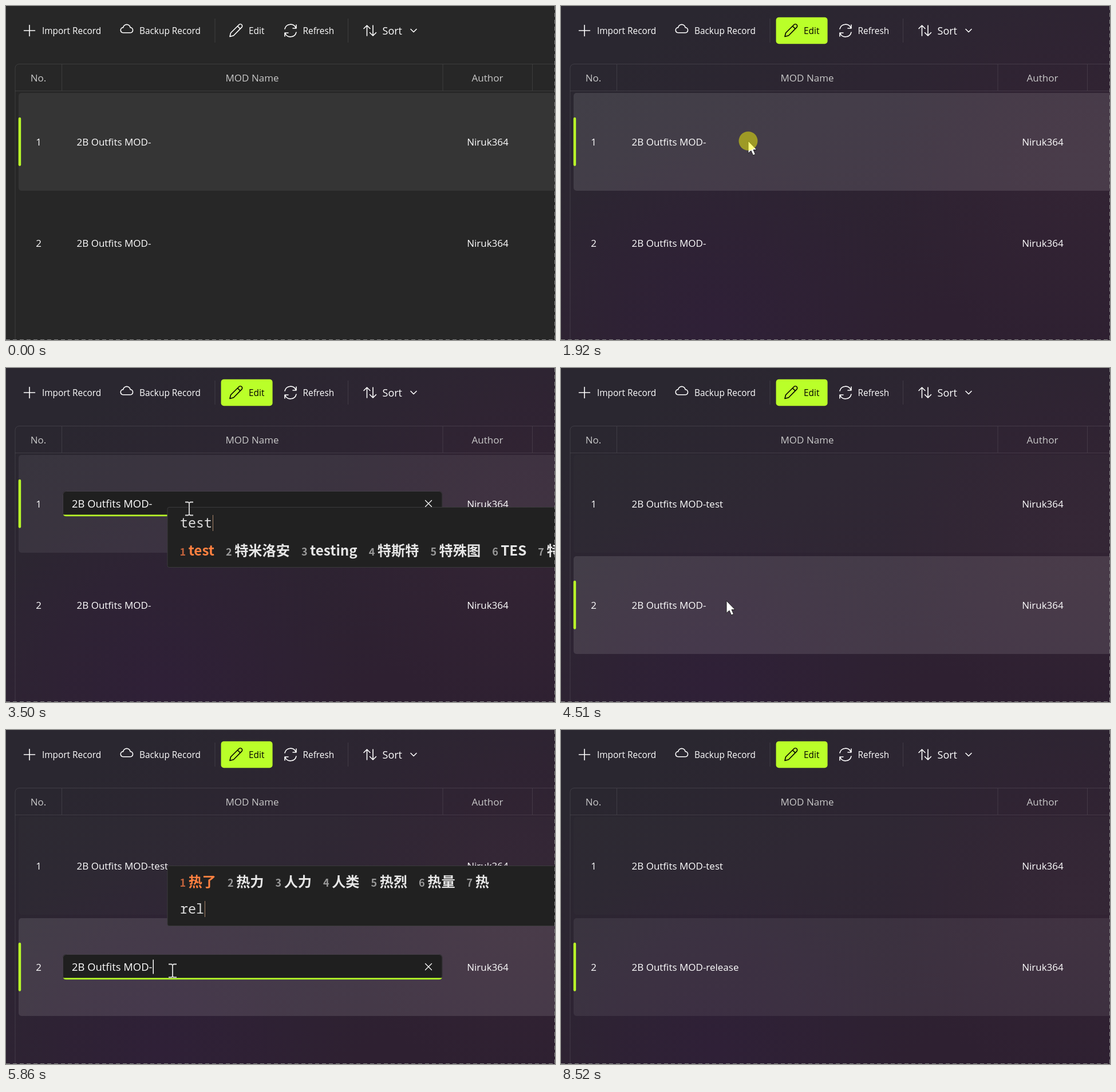
An HTML page that plays this animation: 959x584 px, repeating every 8.69 s.

```html
<!DOCTYPE html>
<html lang="en">
<head>
<meta charset="utf-8">
<title>Inline rename in a record table</title>
<style>
  html, body { margin: 0; width: 100%; height: 100%; overflow: hidden; background: #272727; }
  svg { display: block; width: 100vw; height: 100vh; }
  text { font: 17px "Open Sans", "Noto Sans", sans-serif; fill: #fff; white-space: pre; }
  .tool { font-size: 15.4px; }
  .head { fill: #c9c9c9; }
  .mid { text-anchor: middle; }
  .field { font-size: 18.4px; }
  .typed { font: 23.3px "Noto Sans Mono", monospace; fill: #ddd; }
  .words { font: 700 24.2px "Noto Sans CJK SC", "Noto Sans CJK", sans-serif; fill: #e6e6e6; }
  .num { font-size: 18px; fill: #999; }
  .icon { fill: none; stroke: #fff; stroke-width: 1.6; stroke-linecap: round; stroke-linejoin: round; }
  .line { fill: none; stroke: #fff; stroke-opacity: .1; }
  .dash { fill: none; stroke: #858585; stroke-dasharray: 7 5; }
</style>
</head>
<body>
<svg viewBox="0 0 959 584" preserveAspectRatio="none">
  <defs>
    <linearGradient id="tint" gradientUnits="userSpaceOnUse" x1="250" y1="0" x2="600" y2="584">
      <stop offset="0" stop-color="#2a2730"/>
      <stop offset=".4" stop-color="#2d2532"/>
      <stop offset="1" stop-color="#2e2031"/>
    </linearGradient>
    <radialGradient id="violet" gradientUnits="userSpaceOnUse" cx="270" cy="560" r="330">
      <stop offset="0" stop-color="#2f2037"/>
      <stop offset="1" stop-color="#2f2037" stop-opacity="0"/>
    </radialGradient>
    <radialGradient id="plum" gradientUnits="userSpaceOnUse" cx="900" cy="290" r="330">
      <stop offset="0" stop-color="#332434"/>
      <stop offset="1" stop-color="#332434" stop-opacity="0"/>
    </radialGradient>
    <clipPath id="fieldShape"><rect x="99" y="215" width="663.5" height="44.5" rx="6"/></clipPath>
  </defs>

  <rect width="959" height="584" fill="#272727"/>
  <g id="mica">
    <rect width="959" height="584" fill="url(#tint)"/>
    <rect width="959" height="584" fill="url(#violet)"/>
    <rect width="959" height="584" fill="url(#plum)"/>
  </g>

  <rect id="editButton" x="375.6" y="19.7" width="90" height="46.500" rx="5"/>
  <g class="icon">
    <path d="M31.500 43H50.500M41 33.500V52.500"/>
    <path d="M205 46.800a4.600 4.600 0 0 1-.3-9.200a6.300 6.300 0 0 1 12.400 0a4.600 4.600 0 0 1-.3 9.200Z"/>
    <path id="pencil" d="M391 53.500l1.600-6.500L407 32.700a3.200 3.200 0 0 1 4.700 4.700L397.500 51.800ZM404.500 35.200l4.700 4.700"/>
    <path d="M487 40a10.300 10.300 0 0 1 19.500-1.500M507 33v6h-6M507 46a10.300 10.300 0 0 1-19.500 1.500M487 53v-6h6"/>
    <path d="M630.500 52V34M625 39.500l5.500-5.500l5.500 5.500M641 34V52M635.500 46.500l5.500 5.500l5.500-5.500"/>
    <path d="M707 40.500l5 5l5-5"/>
  </g>
  <text class="tool" x="63" y="49">Import Record</text>
  <text class="tool" x="233" y="49">Backup Record</text>
  <text class="tool" id="editLabel" x="424" y="49">Edit</text>
  <text class="tool" x="518.500" y="49">Refresh</text>
  <text x="657.500" y="49.500" style="font-size:18px">Sort</text>
  <path class="line" d="M365 22V64M597.500 22V64"/>

  <path class="line" d="M16 584V108.500a7 7 0 0 1 7-7H959M16 148.500H959M97.500 102V148M763 102V148M919.500 102V148"/>
  <text class="head mid" x="56.500" y="132">No.</text>
  <text class="head mid" x="430" y="132">MOD Name</text>
  <text class="head mid" x="841" y="132">Author</text>

  <g id="rows"></g>

  <g id="field">
    <rect x="99" y="215" width="663.500" height="44.500" rx="6" fill="#1f1f1f"/>
    <rect x="99.500" y="215.500" width="662.500" height="43.500" rx="6" fill="none" stroke="#433d46"/>
    <rect x="99" y="256.500" width="664" height="3" fill="#baff29" clip-path="url(#fieldShape)"/>
    <rect id="selection" x="116" y="224" width="140.500" height="25" fill="#baff29"/>
    <text class="field" id="fieldText" x="115" y="244"></text>
    <rect id="caret" y="224.500" width="1.500" height="25" fill="#fff"/>
    <path class="icon" d="M732.500 231.500l11 11m0-11l-11 11" style="stroke-width:1.3"/>
  </g>

  <g id="popup">
    <rect x="282" y="0.500" width="690" height="105" rx="3" fill="#212121" stroke="#3b3a3c"/>
    <g id="typedLine">
      <text class="typed" id="typed" x="304" y="36"></text>
      <rect id="typedCaret" y="14" width="1" height="28" fill="#a9856a"/>
    </g>
    <text class="words" id="words" x="303.500"></text>
  </g>

  <path class="dash" d="M0 583.500H959M958.500 0V584"/>

  <path id="arrow" d="M0 0V21.500L5 17L8.500 25L12.500 23.300L9 15.500H15Z" fill="#fff" stroke="#222"/>
  <path id="beam" d="M-7 -11.500H-2L0 -10L2 -11.500H7M0 -10V10M-7 11.500H-2L0 10L2 11.500H7"
        fill="none" stroke="#fff" stroke-width="1.8" style="mix-blend-mode:difference"/>
  <circle id="press" r="16.500" fill="#ff0" fill-opacity=".48"/>
</svg>

<script>
const LOOP = 8690, ROW_STEP = 177, LIME = '#baff29', BASE = '2B Outfits MOD-';
const $ = id => document.getElementById(id);
const show = (id, on) => $(id).style.display = on ? '' : 'none';
const within = (t, ranges) => ranges.some(([from, to]) => t >= from && t < to);
const attr = (id, name, value) => $(id).setAttribute(name, value);
const place = (id, x, y) => attr(id, 'transform', `translate(${x} ${y})`);

// Pointer waypoints: time, x, y
const path = [
  [170, 335, 572], [750, 432, 50], [1290, 432, 50], [1760, 327, 236],
  [2280, 327, 236], [2450, 320, 246], [4110, 320, 246], [4370, 289, 407],
  [4640, 289, 407], [4800, 291, 412], [4950, 291, 412], [5100, 291, 421],
  [8430, 291, 421], [8520, 355, 590]
];
const presses = [[1110, 1230], [1790, 1860], [1920, 2050], [4390, 4470], [4620, 4760]];

const edits = [
  { row: 0, open: 1950, deselect: 2280, commit: 3630, close: 3860, word: 'test', beam: 2120,
    caretOn: [[1950, 2440], [2970, 3500]] },
  { row: 1, open: 4640, deselect: 4950, commit: 6570, close: 7430, word: 'release', beam: 5000,
    caretOn: [[4640, 5150], [5680, 6190], [6700, 7230]] }
];

// Input method states: time, typed letters, candidates
const suggestions = [
  [2630, 't', '他 她 它 天 图 太 听 头 条'],
  [2860, 'te', '特 特别 特点 特斯 忑 特色 特殊 特'],
  [3010, 'tes', '特色 特斯 特殊 test 特设 特 特使'],
  [3170, 'test', 'test 特米洛安 testing 特斯特 特殊图 TES 特殊'],
  [5560, 'r', '人 让 如 日 然 热 入 认 若'],
  [5640, 're', '热 人 惹 热爱 热门 热点 热烈 热'],
  [5760, 'rel', '热了 热力 人力 人类 热烈 热量 热'],
  [5890, 'relea', 'release 热了啊 relea 热乐 热 real'],
  [5990, 'release', 'release 热了 releases 人类 released rel'],
  [6420, 'release', 'release 热了 releases 人类 released releasing']
];

$('rows').innerHTML = [0, 1].map(i => `
  <g transform="translate(0 ${i * ROW_STEP})">
    <rect id="fill${i}" x="22" y="152" width="945" height="171" rx="5" fill="#fff"/>
    <rect id="bar${i}" x="21.700" y="194.800" width="4.500" height="85" rx="2.200" fill="${LIME}"/>
    <text class="mid" x="57" y="244">${i + 1}</text>
    <text id="name${i}" x="123.500" y="244"></text>
    <text class="mid" x="841.500" y="244">Niruk364</text>
  </g>`).join('');

function pointerAt(t) {
  const next = path.findIndex(point => point[0] > t);
  if (next < 1) return null;
  const [t0, x0, y0] = path[next - 1], [t1, x1, y1] = path[next];
  const u = (t - t0) / (t1 - t0), ease = u * u * (3 - 2 * u);
  return { x: x0 + (x1 - x0) * ease, y: y0 + (y1 - y0) * ease };
}

function drawToolbar(t, pointer) {
  const active = t >= 1110;
  const hovered = pointer && pointer.y < 66 && pointer.x > 376;
  show('mica', active);
  attr('editButton', 'fill', active ? LIME : '#fff');
  attr('editButton', 'fill-opacity', active ? 1 : hovered ? .06 : 0);
  $('editLabel').style.fill = $('pencil').style.stroke = active ? '#000' : '#fff';
}

function drawRows(t, pointer, edit) {
  const selected = t < 4400 ? 0 : 1;
  for (const i of [0, 1]) {
    const top = 152 + i * ROW_STEP;
    const hovered = pointer && pointer.y > top && pointer.y < top + 171 && !within(t, [[2660, 3860]]);
    const idle = i === 0 ? .013 : 0;
    attr('fill' + i, 'fill-opacity', i === selected ? (hovered ? .108 : .066) : hovered ? .05 : idle);
    show('bar' + i, i === selected);
    show('name' + i, !edit || edit.row !== i);
    $('name' + i).textContent = BASE + (t >= edits[i].commit ? edits[i].word : '');
  }
}

function drawField(t, edit) {
  show('field', edit);
  if (!edit) return;
  const selecting = t < edit.deselect, done = t >= edit.commit;
  place('field', 0, edit.row * ROW_STEP);
  $('fieldText').textContent = BASE + (done ? edit.word : '');
  $('fieldText').style.fill = selecting ? '#000' : '#fff';
  show('selection', selecting);
  show('caret', within(t, edit.caretOn));
  attr('caret', 'x', done ? 315.5 : 256.5);
}

let shownState;
function drawPopup(t, edit) {
  const state = edit && t < edit.commit &&
    suggestions.filter(([time]) => time >= edit.open && time <= t).pop();
  show('popup', state);
  if (!state || state === shownState) return;
  shownState = state;
  const [, letters, words] = state, above = edit.row === 1;
  place('popup', 0, above ? 237 : 243);
  place('typedLine', 0, above ? 48 : 0);
  attr('words', 'y', above ? 36.5 : 84.5);
  $('typed').textContent = letters;
  attr('typedCaret', 'x', 305 + letters.length * 14);
  $('words').innerHTML = words.split(' ').map((word, i) =>
    `<tspan class="num" dx="${i ? 20 : 0}"${i ? '' : ' style="fill:#c2633c"'}>${i + 1}</tspan>` +
    `<tspan dx="4.500"${i ? '' : ' style="fill:#ff8040"'}>${word}</tspan>`).join('');
}

function drawPointer(t, pointer, edit) {
  const beam = edit && t >= edit.beam;
  show('arrow', pointer && !beam);
  show('beam', pointer && beam);
  show('press', pointer && within(t, presses));
  if (pointer) for (const id of ['arrow', 'beam', 'press']) place(id, pointer.x, pointer.y);
}

function draw(t) {
  const pointer = pointerAt(t);
  const edit = edits.find(e => t >= e.open && t < e.close);
  drawToolbar(t, pointer);
  drawRows(t, pointer, edit);
  drawField(t, edit);
  drawPopup(t, edit);
  drawPointer(t, pointer, edit);
}

const start = performance.now();
function tick() {
  draw((performance.now() - start) % LOOP);
  requestAnimationFrame(tick);
}
tick();
</script>
</body>
</html>
```
